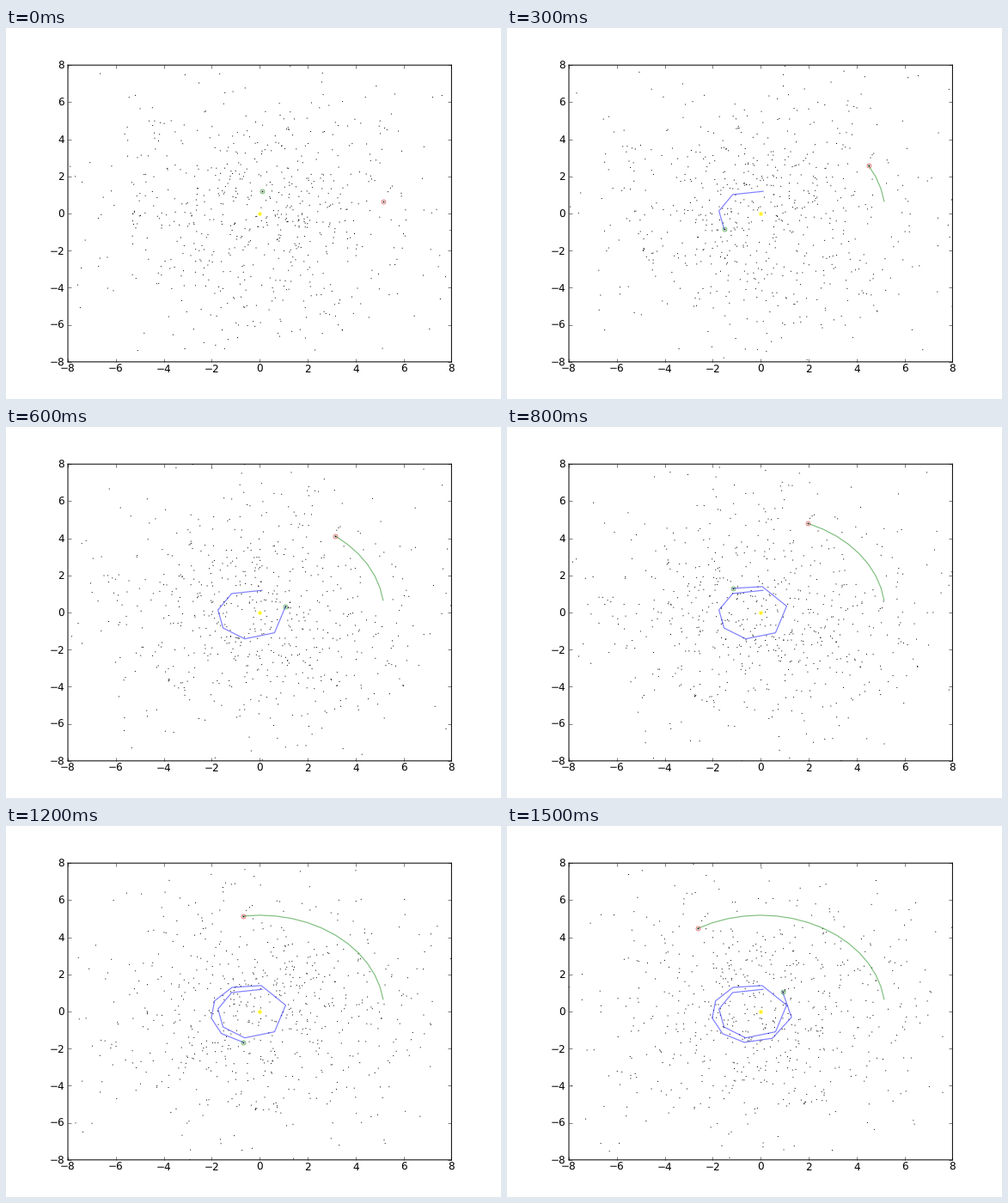
Recreate the animation shown at these times as a matplotlib script. Size 576 by 432 pixels, loop 1.6 s.

```python
import numpy as np
import matplotlib.pyplot as plt
from matplotlib.animation import FuncAnimation

STEPS = 16
STEP_MS = 100
SUBSTEPS = 50
GM = 2.42
SWARM = 700

plt.rcParams.update({
    "font.family": "DejaVu Sans",
    "font.size": 12,
    "text.hinting": "none",
    "path.snap": False,
    "axes.linewidth": 1.0,
    "xtick.direction": "in", "ytick.direction": "in",
    "xtick.top": True, "ytick.right": True,
    "xtick.major.size": 4, "ytick.major.size": 4,
    "xtick.major.width": 0.5, "ytick.major.width": 0.5,
    "xtick.major.pad": 3, "ytick.major.pad": 4,
})


def polar(r, angle):
    return np.column_stack([r * np.cos(angle), r * np.sin(angle)])


def orbit(size, start, ecc=0.0, growth=0.0, peri=0.0):
    """Kepler ellipse whose size grows by a fixed amount per step."""
    angle, radii, angles = np.radians(start), [], []
    for i in range(STEPS * SUBSTEPS):
        p = size + growth * i / SUBSTEPS
        r = p / (1 + ecc * np.cos(angle - np.radians(peri)))
        if i % SUBSTEPS == 0:
            radii.append(r)
            angles.append(angle)
        angle += np.sqrt(GM * p) / r**2 / SUBSTEPS
    return polar(np.array(radii), np.array(angles))


rng = np.random.default_rng(11)
spots = rng.normal(0, 3.5, (SWARM, 2))
swarm_r = np.hypot(*spots.T)
swarm_angle = np.arctan2(spots[:, 1], spots[:, 0])
swarm_rate = np.sqrt(GM / swarm_r**3)

fig = plt.figure(figsize=(8, 6), dpi=72, facecolor="white")
ax = fig.add_axes([0.125, 0.1, 0.775, 0.8])
ax.set(xlim=(-8, 8), ylim=(-8, 8))
ax.set_xticks(range(-8, 9, 2))
ax.set_yticks(range(-8, 9, 2))

# One size per dot keeps the dots at sub-pixel positions.
dots = ax.scatter(*spots.T, s=np.ones(SWARM), marker="s",
                  color="black", linewidths=0)
ax.plot(0, 0, "o", ms=5, color="yellow", mec="none", alpha=0.6)
ax.plot(0, 0, "o", ms=2, color="gold", mec="none")


def planet(path, trail_color, ring_color):
    trail, = ax.plot([], [], color=trail_color, lw=1.2, alpha=0.5)
    ring, = ax.plot([], [], "o", ms=5, mfc="none", mec=ring_color,
                    mew=0.7, alpha=0.75)
    core, = ax.plot([], [], "o", ms=2, color="#222222", mec="none")
    return path, trail, ring, core


planets = [
    planet(orbit(1.25, 85.3, ecc=0.255, growth=0.028, peri=5),
           (0, 0, 1), (0, 0.5, 0)),
    planet(orbit(5.19, 7.3), (0, 0.5, 0), (0.8, 0.1, 0.1)),
]


def draw(step):
    dots.set_offsets(polar(swarm_r, swarm_angle + swarm_rate * step))
    artists = [dots]
    for path, trail, ring, core in planets:
        trail.set_data(*path[:step + 1].T)
        for mark in (ring, core):
            mark.set_data(*path[step:step + 1].T)
        artists += [trail, ring, core]
    return artists


anim = FuncAnimation(fig, draw, frames=STEPS, interval=STEP_MS,
                     repeat=True, repeat_delay=0)
plt.show()
```
